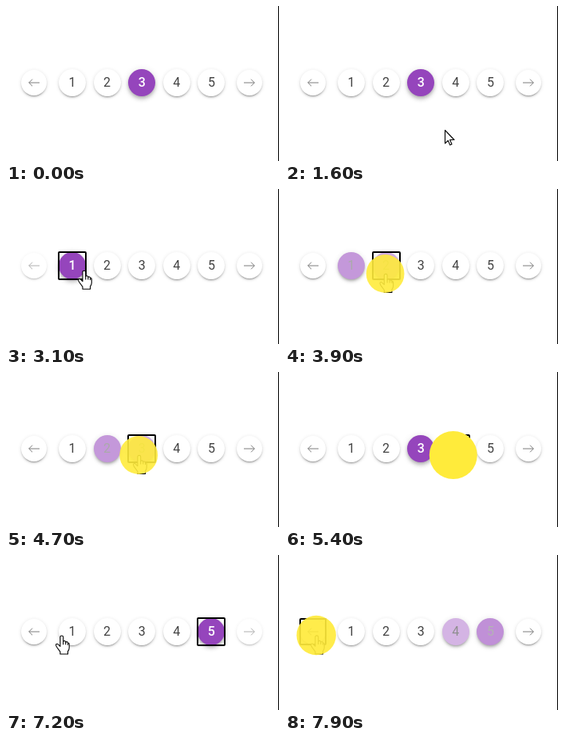
An HTML page for the animation above (8 s loop, 342 px wide and 194 px high).

```html
<!DOCTYPE html>
<html lang="en">
<head>
<meta charset="utf-8">
<title>Pagination</title>
<style>
html, body { margin: 0; width: 100%; height: 100%; overflow: hidden; background: #fff; }
#stage { position: absolute; left: 0; top: 0; width: 342px; height: 194px; overflow: hidden; }
#edge { position: absolute; left: 341px; top: 0; width: 1px; height: 194px; background: #000; }
.btn {
  position: absolute; display: flex; align-items: center; justify-content: center;
  border-radius: 50%; background: #fff; color: #424242;
  font: 16px/24px Roboto, Arial, sans-serif;
}
.btn svg { width: 16px; height: 16px; fill: none; stroke: #7c7c7c; stroke-width: 1; }
#focus { position: absolute; box-sizing: border-box; border: 2px solid #000; border-radius: 2px; }
#overlay { position: absolute; left: 0; top: 0; }
.cursor { fill: #fff; stroke: #000; stroke-width: 1.1; stroke-linejoin: round; }
</style>
</head>
<body>
<div id="stage">
  <div id="edge"></div>
  <div id="focus"></div>
  <svg id="overlay" width="342" height="194">
    <g id="hand" class="cursor">
      <path d="M-1.3 2Q-1.3 .4 .6 .4T2.5 2V7.6Q3.1 6.6 4.4 6.9 5.4 7.2 5.6 8.4 6.7 7.6 7.7 8.2 8.3 8.6 8.4 9.6 10 9.2 10 11.3V15.6Q10 17.6 8.3 20V23.4H-1.3V20.5L-5.6 14.6Q-7.1 12.2 -6.5 11.1 -5 9.7 -3.3 11.8L-1.3 13.7Z"/>
      <path d="M2.5 7.6V11.6M5.6 8.4V11.6M8.4 9.6V12" fill="none"/>
    </g>
    <path id="arrow" class="cursor" d="M.5 .5V17L4.3 13.4 6.7 19 9 18 6.6 12.5H12Z"/>
    <circle id="ring" fill="#ffeb3b"/>
  </svg>
</div>
<script>
const LOOP = 8000, FADE = 300, SHRINK = 250;
const SETTLE = 250, HOLD = 200, FOCUS_LAG = 40;
const RADIUS = 30, PITCH = 43.6, NAV_GAP = 47.8;
const MID_X = 170.2, MID_Y = 96, FIRST_PAGE = 3, LAST = 6;
const WHITE = [255, 255, 255], INK = [66, 66, 66], PURPLE = [149, 69, 188];

// y offset, blur, spread, alpha
const REST = [[3, 1, -2, .2], [2, 2, 0, .14], [1, 5, 0, .12]];
const RAISED = [[2, 4, -1, .2], [4, 5, 0, .14], [1, 10, 0, .12]];

const isNav = i => i === 0 || i === LAST;
const sizeOf = i => isNav(i) ? 32 : 34;
const centerOf = i => {
  const side = i - LAST / 2;
  return MID_X + (isNav(i) ? Math.sign(side) * (2 * PITCH + NAV_GAP) : side * PITCH);
};

// The pointer glides to a button, settles, presses and releases.
function stop(button, dx, dy, press, glide) {
  const arrive = press - SETTLE;
  return {
    button, press, arrive, leave: arrive - glide, release: press + HOLD,
    x: centerOf(button) + dx, y: MID_Y + dy
  };
}
const ENTRY = { x: 200, y: 155 };
const STOPS = [
  stop(1, 1, 4, 2450, 600),
  stop(2, -1, 10, 3650, 480),
  stop(3, -4, 8, 4450, 250),
  stop(4, -3, 8, 5250, 200),
  stop(5, -13, 5.5, 5985, 250),
  stop(0, 4, 4.5, 7657, 855)
];

const $ = id => document.getElementById(id);
const clamp = k => Math.min(1, Math.max(0, k));
const smooth = k => k * k * (3 - 2 * k);
const mix = (a, b, k) => a + (b - a) * k;
const mixColor = (a, b, k) => `rgb(${a.map((v, i) => Math.round(mix(v, b[i], k)))})`;
const mixShadow = k => REST.map((layer, i) => {
  const [y, blur, spread, alpha] = layer.map((v, j) => mix(v, RAISED[i][j], k));
  return `0 ${y}px ${blur}px ${spread}px rgba(0,0,0,${alpha})`;
}).join();

function place(el, i, size) {
  el.style.left = centerOf(i) - size / 2 + 'px';
  el.style.top = MID_Y - size / 2 + 'px';
  el.style.width = el.style.height = size + 'px';
}

const buttons = Array.from({ length: LAST + 1 }, (_, i) => {
  const el = document.createElement('div');
  el.className = 'btn';
  if (isNav(i)) {
    const flip = i ? ' transform="matrix(-1 0 0 1 16 0)"' : '';
    el.innerHTML = `<svg viewBox="0 0 16 16"><path${flip} d="M15 8H1.7M6 3.7L1.7 8 6 12.3"/></svg>`;
    el.style.boxShadow = mixShadow(0);
  } else {
    el.textContent = i;
  }
  place(el, i, sizeOf(i));
  $('stage').insertBefore(el, $('focus'));
  return el;
});

// cubic-bezier(0, 0, .2, 1)
function ease(x) {
  if (x >= 1) return 1;
  let lo = 0, hi = 1;
  for (let n = 0; n < 20; n++) {
    const u = (lo + hi) / 2;
    if (.6 * u * u + .4 * u ** 3 < x) lo = u; else hi = u;
  }
  return smooth(lo);
}

function pointerAt(t) {
  let { x, y } = ENTRY;
  for (const s of STOPS) {
    const k = smooth(clamp((t - s.leave) / (s.arrive - s.leave)));
    x = mix(x, s.x, k);
    y = mix(y, s.y, k);
  }
  return [x, y];
}

function drawPages(t) {
  let from = FIRST_PAGE, page = FIRST_PAGE, since = -FADE;
  for (const { button, release } of STOPS) {
    if (t < release) break;
    from = page;
    page = button === 0 ? page - 1 : button === LAST ? page + 1 : button;
    since = release;
  }
  const k = ease((t - since) / FADE);
  for (let i = 1; i < LAST; i++) {
    const on = i === page ? k : i === from ? 1 - k : 0;
    const style = buttons[i].style;
    style.backgroundColor = mixColor(WHITE, PURPLE, on);
    style.color = mixColor(INK, WHITE, on);
    style.fontWeight = on > .6 ? 500 : 400;
    style.boxShadow = mixShadow(on);
  }
  buttons[0].style.opacity = page === 1 ? .6 : 1;
  buttons[LAST].style.opacity = page === LAST - 1 ? .6 : 1;
}

function drawFocus(t) {
  const last = STOPS.filter(s => t >= s.press + FOCUS_LAG).pop();
  $('focus').style.display = last ? 'block' : 'none';
  if (last) place($('focus'), last.button, sizeOf(last.button) + 2);
}

function drawPointer(t) {
  const shown = t >= STOPS[0].leave;
  $('overlay').style.display = shown ? 'block' : 'none';
  if (!shown) return;
  const [x, y] = pointerAt(t);
  const over = buttons.some((_, i) => Math.hypot(x - centerOf(i), y - MID_Y) <= sizeOf(i) / 2);
  for (const [id, visible] of [['hand', over], ['arrow', !over]]) {
    $(id).setAttribute('transform', `translate(${x} ${y})`);
    $(id).style.display = visible ? 'inline' : 'none';
  }
  const active = STOPS.find(s => t >= s.press && t < s.release + SHRINK);
  const p = active ? clamp((t - active.release) / SHRINK) : 1;
  const ring = $('ring');
  ring.setAttribute('cx', x);
  ring.setAttribute('cy', y);
  ring.setAttribute('r', RADIUS * (1 - p));
  ring.setAttribute('opacity', 1 - p / 2);
}

const start = performance.now();
function frame(now) {
  const t = Math.max(0, now - start) % LOOP;
  drawPages(t);
  drawFocus(t);
  drawPointer(t);
  requestAnimationFrame(frame);
}
frame(start);
</script>
</body>
</html>
```
